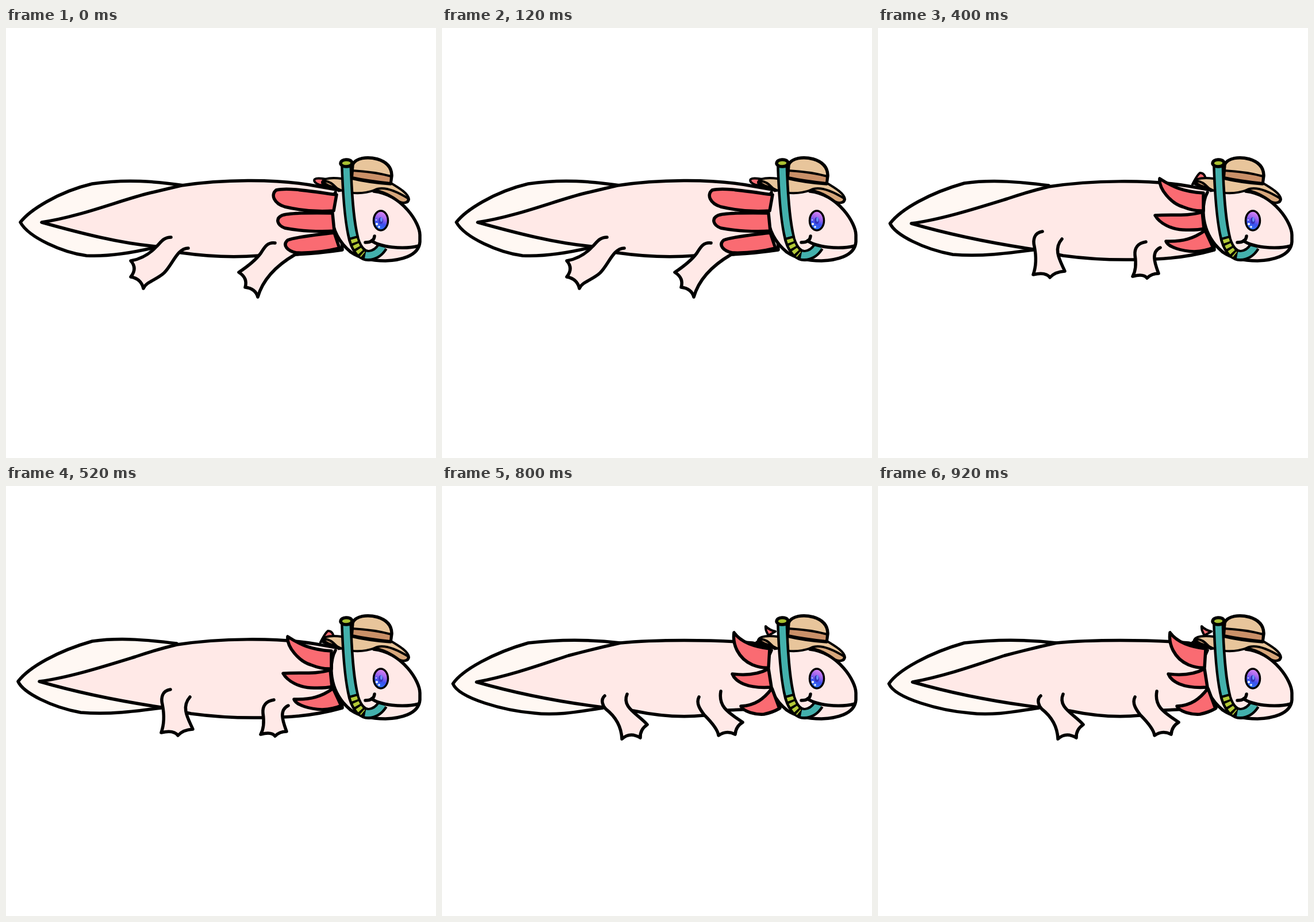
These frames come from a looping animation (748x748 px, 1 s). An HTML page:

```html
<!DOCTYPE html>
<html lang="en">
<head>
<meta charset="utf-8">
<title>Swimming axolotl</title>
<style>
html, body { margin: 0; width: 100%; height: 100%; overflow: hidden; background: #fff; }
svg { display: block; width: 100%; height: 100%; }
path, ellipse { stroke-linecap: round; stroke-linejoin: round; }
.ink { stroke: #000; stroke-width: 5.5; fill: none; }
.thin { stroke-width: 4; }
.skin { fill: #ffe9e7; }
.gill { fill: #fa6b72; }
.straw { fill: #e8c59b; }
</style>
</head>
<body>
<svg viewBox="0 0 748 748">
  <defs>
    <linearGradient id="iris" x1=".7" y1="0" x2=".4" y2="1">
      <stop offset="0" stop-color="#e58cf5"/>
      <stop offset=".4" stop-color="#9a62ee"/>
      <stop offset=".65" stop-color="#3c50ee"/>
      <stop offset="1" stop-color="#2b7cf5"/>
    </linearGradient>
  </defs>

  <path id="fin" class="ink" fill="#fff8f3" style="fill:#fff8f3"/>
  <path id="body" class="ink skin"/>
  <path id="hind" class="ink skin"/>
  <path id="front" class="ink skin"/>
  <path id="back" class="ink gill thin"/>

  <!-- head -->
  <path class="skin" d="M573 286L605 282 660 288C695 301 720 338 720 360V372Q717 403 660 405 622 405 600 390C578 372 568 350 566 325Q565 300 573 286Z"/>
  <path class="ink" d="M640 284C690 290 720 340 720 360V372C718 398 684 404 660 405Q622 405 600 390C578 372 568 350 566 325Q565 300 573 286"/>
  <path id="gills" class="ink gill"/>

  <!-- hat -->
  <path class="ink straw thin" d="M550 268C553 261 568 260 584 262L602 261 670 270C685 279 700 288 701 298 700 306 690 305 684 302 668 289 655 285 641 282 620 290 592 289 574 278 560 275 549 273 550 268Z"/>
  <path class="ink thin" style="fill:#d7a77b" d="M641 282C655 274 676 282 699 296 702 303 692 306 684 302 668 290 655 284 641 282Z"/>
  <path class="ink thin" style="fill:#d7a77b" d="M551 267Q562 264 575 278 558 275 551 267Z"/>
  <path class="ink straw" d="M601 261L603 238C608 226 628 223 646 228 666 234 671 246 671 257L669 271Q630 268 601 261Z"/>
  <path class="ink thin" style="fill:#ca9068" d="M603 248Q640 250 670 258L669 270Q630 266 602 260Z"/>

  <!-- snorkel -->
  <g fill="none">
    <path stroke="#000" stroke-width="20" style="stroke-linecap:butt" d="M592 238C594 300 598 340 605 368 611 388 622 397 632 396 644 394 650 388 655 380"/>
    <path stroke="#43b0ac" stroke-width="11" style="stroke-linecap:butt" d="M592 238C594 300 598 340 604 363M625 395C640 398 650 388 655 380"/>
    <path stroke="#b4ca38" stroke-width="11" stroke-dasharray="6 4" style="stroke-linecap:butt" d="M605 367Q610 385 621 394"/>
  </g>
  <path class="ink" style="fill:#a9c132" d="M582 236C582 227 600 227 602 234 602 243 584 243 582 236Z"/>

  <!-- face -->
  <path class="ink" d="M625 373Q640 373 641 362M636 370C650 381 690 386 718 379"/>
  <ellipse class="ink" style="fill:url(#iris);stroke-width:3.5" cx="652" cy="335" rx="12.5" ry="17"/>
  <ellipse cx="652" cy="335" rx="4" ry="6" fill="#3434b8"/>
  <ellipse cx="653" cy="333" rx="2" ry="4" fill="#6a8cf8"/>
  <g fill="#fff">
    <circle cx="645" cy="341" r="2"/>
    <circle cx="649" cy="346" r="1.7"/>
    <circle cx="644" cy="334" r="1"/>
  </g>
</svg>
<script>
const poses = [
  {
    fin: "M310 274C260 267 210 262 150 271 90 285 40 318 25 338 40 365 100 391 140 396 180 398 225 390 262 381",
    body: "M62 338C130 328 200 299 250 287Q280 280 305 274C370 264 470 261 540 275L580 282 585 386Q545 392 503 394L440 396Q375 401 305 391L262 380C200 375 130 357 62 338Z",
    hind: "M287 364C274 364 270 372 262 380 250 393 235 402 217 405Q229 418 217 433 235 436 239 453C243 442 262 438 275 426 290 411 298 383 317 383",
    front: "M468 374C455 372 450 381 443 392 434 404 420 415 405 425Q421 435 416 451 434 453 438 468C446 440 467 415 503 394",
    gills: "M575 290C530 284 490 277 470 282 460 290 466 305 485 311 515 318 545 320 570 318ZM568 322C530 321 490 322 480 326 468 332 472 343 485 348 510 353 545 355 571 353ZM571 356C540 360 505 363 490 369 480 378 490 388 505 391 535 392 560 388 580 383Z",
    back: "M554 273C545 275 533 268 537 263 541 260 550 262 558 263Z"
  },
  {
    fin: "M300 274C260 271 200 274 150 288 100 305 50 340 28 380 25 404 50 410 100 413 165 415 200 396 268 381",
    body: "M53 380C90 352 150 319 215 295Q255 282 290 276C370 264 470 260 540 275L580 282 585 382Q545 392 493 396L440 399Q375 404 309 393L268 380C200 372 100 375 53 380Z",
    hind: "M294 355C280 353 272 365 271 378 269 395 262 408 256 421Q274 419 280 433 288 424 301 436C309 425 303 400 309 383Q312 377 320 377",
    front: "M470 372C457 372 447 383 445 395 441 412 430 425 425 437Q452 430 459 447 466 439 477 444C475 428 474 409 493 394",
    gills: "M573 288C540 290 490 285 470 286 470 300 500 312 535 317L565 320ZM563 320C530 328 495 331 477 335 480 346 505 354 564 352ZM568 352C545 362 505 370 496 378 500 387 530 386 580 380Z",
    back: "M562 262C552 253 541 256 545 263L552 273Z"
  },
  {
    fin: "M297 274C250 268 200 263 150 270 90 287 40 315 21 340 30 360 80 385 130 394 180 398 225 392 270 386",
    body: "M58 340C110 333 170 314 225 297Q260 285 297 276C370 265 470 263 540 275L580 282 585 386Q535 400 482 402L446 403Q380 404 322 396L270 385C190 373 120 358 58 340Z",
    hind: "M286 354C272 356 269 368 272 380 276 400 275 415 270 429Q292 424 299 434 308 424 325 423C317 405 304 385 320 367",
    front: "M466 372C452 374 446 383 447 395 450 415 447 425 443 432Q462 427 468 435 476 427 488 427C482 410 474 390 491 382",
    gills: "M566 287C530 285 510 275 490 262 488 280 510 305 530 311Q550 319 566 318ZM564 320C540 328 510 324 482 326 490 340 510 350 530 351Q555 352 567 349ZM569 352C550 366 530 372 501 371 505 382 530 388 550 389Q570 388 583 382Z",
    back: "M570 262Q568 252 560 252 555 256 547 272Z"
  },
  {
    fin: "M310 273C240 273 160 262 100 258 50 257 26 265 29 280 40 300 70 340 110 365 160 390 220 386 278 383",
    body: "M52 283C100 292 200 296 240 285Q270 279 310 273C370 266 470 264 540 275L580 282 585 386Q520 399 474 402L437 400Q380 405 325 396L278 382C180 360 100 320 52 283Z",
    hind: "M295 358C280 360 278 372 281 382 290 397 300 418 297 436Q312 425 326 436 328 424 342 418C330 400 312 388 325 371",
    front: "M444 367C430 369 432 385 437 395 446 410 451 423 451 436Q462 426 475 435 476 424 489 420C474 408 468 392 474 378",
    gills: "M572 288C535 283 510 280 490 258 492 280 515 307 540 314Q555 318 565 317ZM564 319C545 330 520 334 499 334 503 345 525 353 545 352Q558 353 568 349ZM570 351C560 370 540 380 515 381 517 388 535 393 553 392Q572 388 583 381Z",
    back: "M580 258Q573 248 565 247 563 255 567 262 555 262 548 271Z"
  },
  {
    fin: "M310 273C260 267 210 266 150 273 90 290 35 320 19 344 30 370 110 391 160 395 200 400 240 392 280 386",
    body: "M60 341C120 330 180 308 220 295Q265 283 310 273C370 267 470 267 540 273L580 282 588 386Q540 388 498 390L456 399Q400 405 333 391L280 385C200 375 130 361 60 341Z",
    hind: "M283 365C275 372 280 383 285 388 303 402 312 420 313 440Q327 427 345 438 344 424 357 415C340 396 312 385 322 362",
    front: "M447 367C441 378 450 390 456 398 470 412 480 425 481 434Q495 424 510 432 511 418 523 411C500 395 480 385 485 357",
    gills: "M570 283C545 280 520 272 508 255 505 275 515 300 540 311Q555 317 568 316ZM568 318C550 328 530 330 505 327 510 340 530 353 573 350ZM574 352C560 370 545 382 520 383 525 393 545 398 560 397Q575 394 587 387Z",
    back: "M580 253Q570 251 563 244 562 252 569 261 556 263 547 272Z"
  }
];

const STEP = 200;
const start = performance.now();
let shown = -1;

function draw() {
  const i = Math.floor((performance.now() - start) / STEP) % poses.length;
  if (i !== shown) {
    for (const [part, d] of Object.entries(poses[i])) {
      document.getElementById(part).setAttribute("d", d);
    }
    shown = i;
  }
  requestAnimationFrame(draw);
}
draw();
</script>
</body>
</html>
```
